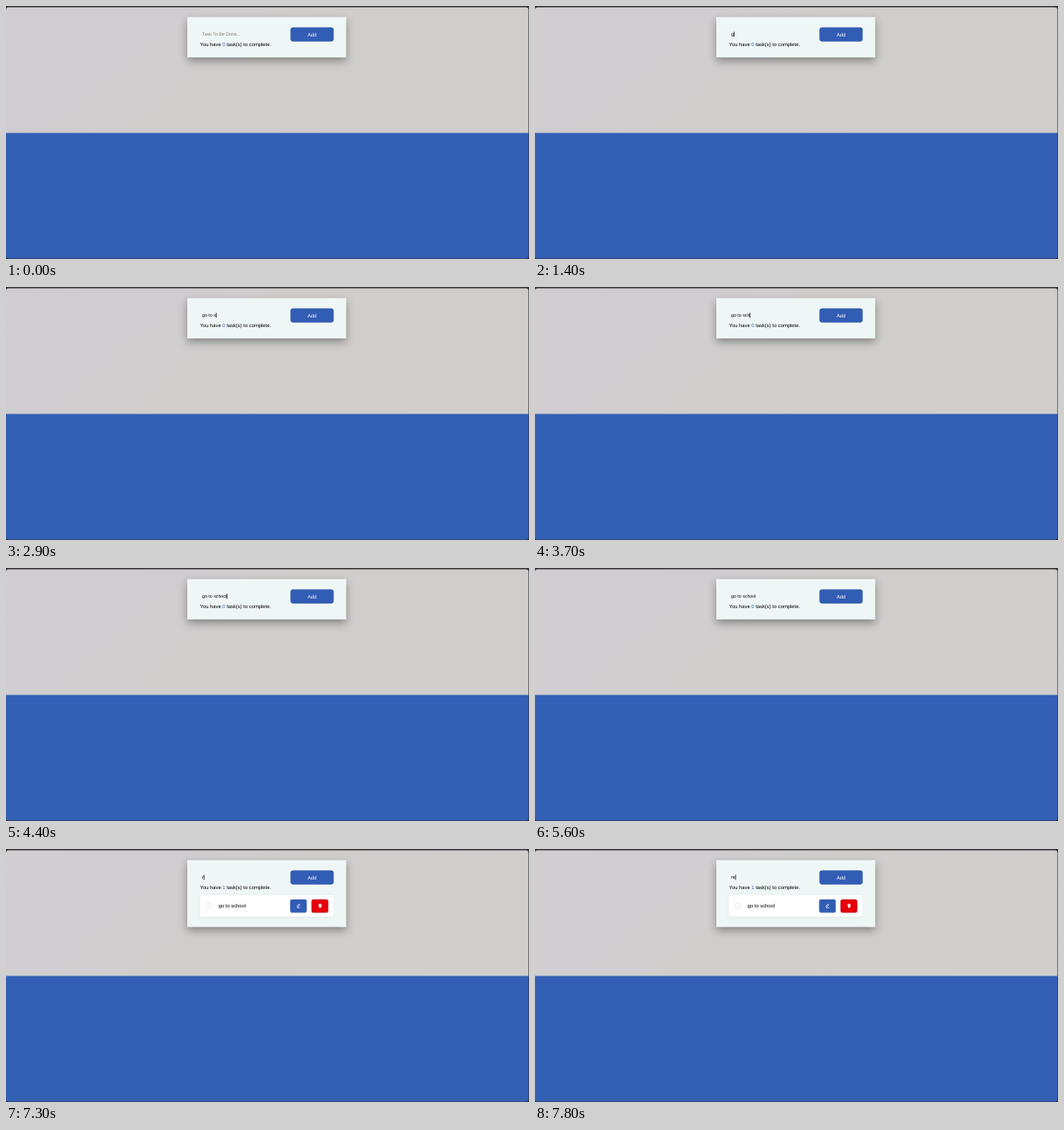
An HTML page that plays this animation: 600 by 290 pixels, repeating every 8000 ms.

```html
<!DOCTYPE html>
<html lang="en">
<head>
<meta charset="utf-8">
<title>Task list</title>
<style>
  html, body { margin: 0; width: 100%; height: 100%; overflow: hidden; background: #343336; }
  svg { display: block; width: 600px; height: 290px; }
  text { font: 5.83px "Liberation Sans", Arial, sans-serif; text-rendering: geometricPrecision; }
  .card { fill: #eff7f6; filter: drop-shadow(0 4.5px 5px rgba(0, 0, 0, .36)); }
  .row { fill: #fff; filter: drop-shadow(0 1px 2px rgba(0, 0, 0, .05)); }
  .blue { fill: #315db4; }
  .red { fill: #e60009; stroke: #a5000c; stroke-width: .6; }
  .blue.btn { stroke: #2a54a8; stroke-width: .5; }
  #entry { font-size: 5.25px; }
  #entry.hint { fill: #827c75; }
  .icon { fill: none; stroke: #fff; stroke-width: .7; }
</style>
</head>
<body>
<svg viewBox="0 0 600 290">
  <defs>
    <linearGradient id="wall" x1="0" y1="0" x2="1" y2=".3">
      <stop offset="0" stop-color="#d1cdd1"/>
      <stop offset=".3" stop-color="#d0cdd0"/>
      <stop offset=".55" stop-color="#cfcecc"/>
      <stop offset="1" stop-color="#d0cecd"/>
    </linearGradient>
    <clipPath id="window"><rect y="1.6" width="599.4" height="287.9" rx="3"/></clipPath>
  </defs>

  <g clip-path="url(#window)">
    <rect width="600" height="146" fill="url(#wall)"/>
    <rect y="145.5" width="600" height="145" fill="#335fb5"/>
  </g>

  <rect id="card" class="card" x="208" y="12.7" width="182.3" height="46.2"/>
  <text id="entry" x="225" y="34.3"></text>
  <rect id="caret" y="29.6" width=".75" height="5.7"/>
  <rect class="blue btn" x="326.6" y="24.8" width="49.1" height="15.6" rx="2.4"/>
  <text x="351.1" y="34.7" fill="#fff" text-anchor="middle">Add</text>
  <text x="222.6" y="46.1">You have <tspan id="count" fill="#315db4">0</tspan> task(s) to complete.</text>

  <g id="task">
    <rect class="row" x="222.6" y="53.1" width="153.2" height="24.4" rx="2"/>
    <circle cx="232" cy="65.2" r="3.3" fill="#fff" stroke="#dcdcdc" stroke-width=".6"/>
    <text x="243.7" y="67.4">go to school</text>
    <rect class="blue btn" x="326.2" y="58" width="18.6" height="14.8" rx="1.8"/>
    <path class="icon" d="M334 66.2v-.9l2.2-2.3.9.8-2.2 2.4zM333.8 67.2h3.6"/>
    <rect class="red" x="350.8" y="58" width="18.6" height="14.8" rx="1.8"/>
    <path class="icon" d="M358.3 63.6h4M359.6 63h1.4"/>
    <path d="M358.7 64.1h3.2l-.3 3.1h-2.6z" fill="#fff"/>
  </g>
</svg>
<script>
  const LOOP = 8000, ADDED = 5800, HINT = "Task To Be Done...";
  const FIRST = "go to school", SECOND = "re";
  const firstKeys = [1400, 1800, 2100, 2300, 2500, 2700, 2900, 3200, 3700, 4100, 4200, 4400];
  const secondKeys = [7300, 7800];
  const caretSpans = [[800, 5000], [6700, LOOP]];

  const [card, entry, caret, count, task] =
    ["card", "entry", "caret", "count", "task"].map(id => document.getElementById(id));

  const typed = (word, keys, t) => word.slice(0, keys.filter(k => k <= t).length);
  const show = (el, on) => el.setAttribute("visibility", on ? "visible" : "hidden");

  function draw(t) {
    const added = t >= ADDED;
    const value = added ? typed(SECOND, secondKeys, t) : typed(FIRST, firstKeys, t);

    // Non-breaking spaces keep a trailing space in the measured width.
    entry.textContent = (value || HINT).replace(/ /g, "\u00a0");
    entry.classList.toggle("hint", !value);
    caret.setAttribute("x", 225 + (value ? entry.getComputedTextLength() : 0));
    show(caret, caretSpans.some(([a, b]) => t >= a && t < b));

    count.textContent = added ? 1 : 0;
    card.setAttribute("height", added ? 76.7 : 46.2);
    show(task, added);
  }

  const start = performance.now();
  function tick() {
    draw((performance.now() - start) % LOOP);
    requestAnimationFrame(tick);
  }
  tick();
</script>
</body>
</html>
```
